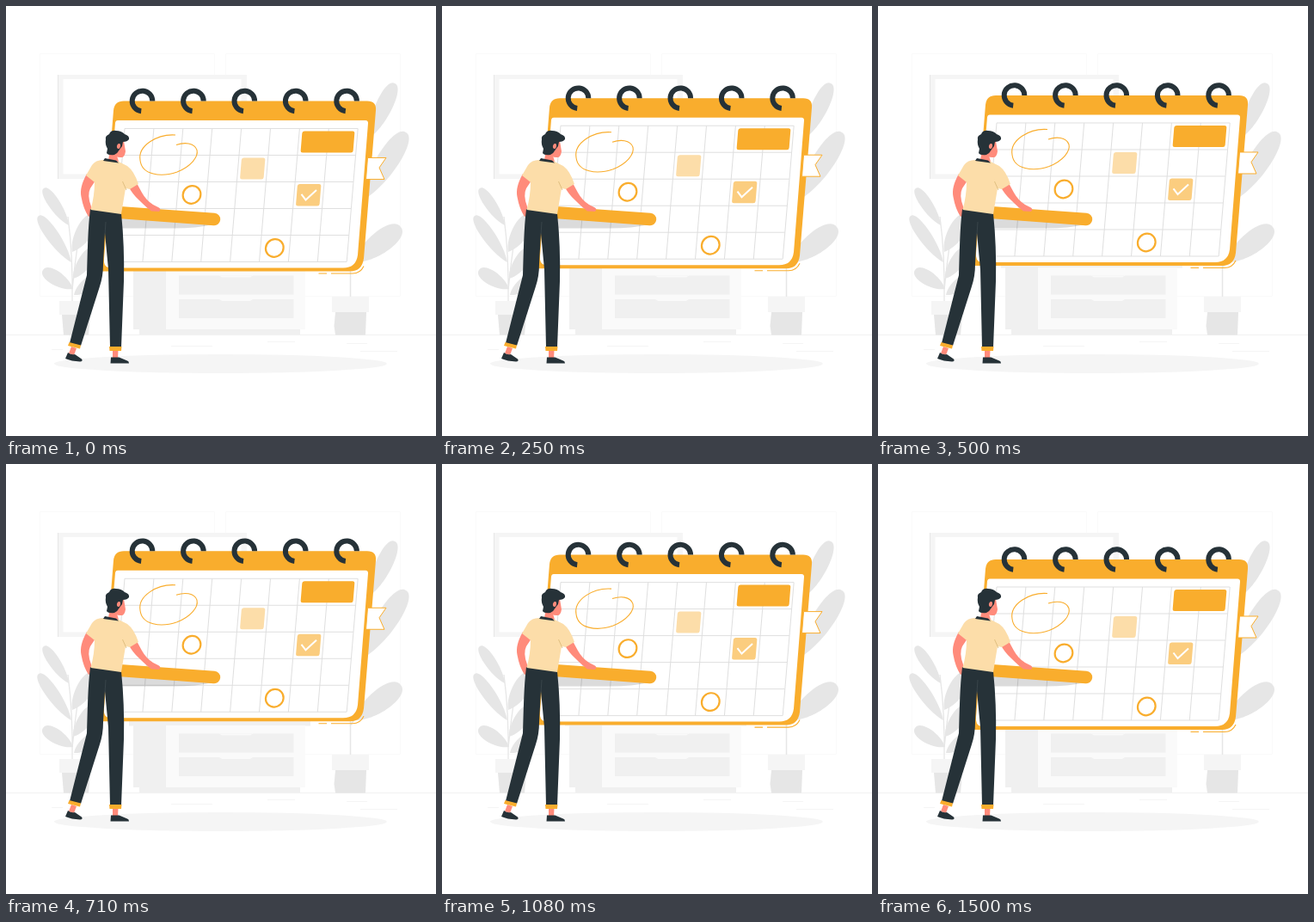
Animation of 500x500 px, one loop 1540 ms. Source, as an HTML page with a canvas:

```html
<!DOCTYPE html>
<html lang="en">
<head>
<meta charset="utf-8">
<title>Planning calendar</title>
<style>
html, body { margin: 0; width: 100%; height: 100%; overflow: hidden; background: #fff; }
canvas { display: block; width: 500px; height: 500px; }
</style>
</head>
<body>
<canvas id="stage" width="500" height="500"></canvas>
<script>
const ctx = document.getElementById('stage').getContext('2d');
const LOOP = 1540, STEPS = 37, RISE = 10;
const ORANGE = '#f9ad2d', CREAM = '#fcdda9', DARK = '#263238', SKIN = '#ff8b7b';
const LEAF = '#e6e6e6', PALE = '#f0f0f0', FAINT = '#f5f5f5', WHITE = '#fff';

function fill(color, path) {
  ctx.fillStyle = color;
  ctx.fill(new Path2D(path));
}

function line(color, width, path) {
  ctx.strokeStyle = color;
  ctx.lineWidth = width;
  ctx.stroke(new Path2D(path));
}

function box(color, x, y, w, h) {
  ctx.fillStyle = color;
  ctx.fillRect(x, y, w, h);
}

function ellipse(x, y, rx, ry, tilt = 0) {
  ctx.beginPath();
  ctx.ellipse(x, y, rx, ry, tilt, 0, Math.PI * 2);
}

// Rounded box that leans with the calendar page.
function tile(color, x, y, w, h) {
  ctx.save();
  ctx.transform(1, 0, -0.08, 1, x, y);
  ctx.fillStyle = color;
  ctx.beginPath();
  ctx.roundRect(0, 0, w, h, 2.5);
  ctx.fill();
  ctx.restore();
}

// Leaf from its base to its tip, bulging by w on both sides.
function leaf(x1, y1, x2, y2, w) {
  const dx = x2 - x1, dy = y2 - y1, len = Math.hypot(dx, dy);
  const nx = -dy / len * w, ny = dx / len * w;
  const side = s => [x1 + dx * .3 + nx * s, y1 + dy * .3 + ny * s,
                     x1 + dx * 1.02 + nx * s, y1 + dy * 1.02 + ny * s];
  const [a, b, c, d] = side(1), [e, f, g, h] = side(-1);
  fill(LEAF, `M${x1} ${y1}C${a} ${b} ${c} ${d} ${x2} ${y2}C${g} ${h} ${e} ${f} ${x1} ${y1}Z`);
}

function drawRoom() {
  line('#fafafa', 1, 'M39.5 55.5H242.5V337.5H39.5ZM255.5 55.5H458.5V337.5H255.5Z');
  box(FAINT, 60, 80, 220, 121);
  box(WHITE, 66.5, 85, 207, 110.5);
  box('#e6e6e6', 60, 80, 1, 121);
  line('#f2f2f2', 1, 'M0 382.5H500');
  line('#f5f5f5', 1, 'M192 395.5H240M304 390.5H336M396 392.5H420M412 401.5H455M53 399.5H66');

  box(PALE, 143, 299, 211, 5.5);
  box('#fafafa', 186, 304, 162, 72);
  box(PALE, 148, 304, 38, 72);
  box(PALE, 155, 376, 187, 6);
  for (const y of [313.5, 341]) {
    box(PALE, 201, y, 133.5, 22);
    fill('#fafafa', `M248 ${y}H287L284 ${y + 2}H251Z`);
  }
  fill(FAINT, 'M56 416A193.5 11 0 0 1 443 416A193.5 11 0 0 1 56 416Z');
}

function drawPlants() {
  line(LEAF, 1.5, 'M400.5 340V285Q402 230 422 170M400 305Q404 296 414 292');
  leaf(422, 154, 452, 90, 13);
  leaf(414, 226, 465, 147, 17);
  leaf(405, 298, 459, 257, 17);
  box(FAINT, 379, 338, 43, 18);
  fill(LEAF, 'M383 356H419L418 382.5H383L381.5 372Z');

  line(LEAF, 1.3, 'M77 345Q78 290 72 245M77 330Q80 300 84 272');
  leaf(73, 255, 44, 212, 9);
  leaf(76, 298, 38, 244, 10);
  leaf(78, 329, 43, 307, 11);
  leaf(77, 286, 103, 243, 13);
  leaf(78, 317, 104, 281, 11);
  leaf(79, 336, 108, 314, 10);
  box(FAINT, 62, 343, 38, 16);
  fill(LEAF, 'M65 359H98L96 382.5H67Z');
}

function drawGrid() {
  let path = '';
  for (let row = 0; row < 6; row++) {
    const y = 143 + row * 31, x = 138 - row * 2.6;
    path += `M${x} ${y}H${x + 271}`;
  }
  for (let col = 0; col < 9; col++) {
    const x = 138 + col * 33.9;
    path += `M${x} 143L${x - 13} 298`;
  }
  line('#dfdfdf', 1, path);
}

function drawCalendar() {
  fill(ORANGE, 'M137 111H420Q431 111 430 122L416 294Q414 309 400 309H110L125 122Q126 111 137 111Z');
  fill(WHITE, 'M127 136.5Q127.3 133.5 130 133.5H418Q421.3 133.5 421 137L409 290Q407 305 392 305H120Q113 304 114 294Z');
  drawGrid();

  tile(ORANGE, 344.5, 146, 61, 25);
  tile(CREAM, 274, 177, 27.5, 25);
  tile('#fbcd7f', 339, 207.5, 27.5, 25.5);
  line(WHITE, 2, 'M343.5 219.5L348.5 226L361 214.5');
  ctx.strokeStyle = ORANGE;
  ctx.lineWidth = 2.2;
  for (const [x, y] of [[216, 220], [312.3, 282]]) {
    ellipse(x, y, 10.7, 10, -Math.PI / 4);
    ctx.stroke();
  }
  line(ORANGE, 1.1, 'M197 150.5C176 149 153 163 156 180C158 197 180 200 199 193.500C215 187 224 176 222 168C219 159 207 159 198 162');

  ctx.strokeStyle = DARK;
  ctx.lineWidth = 6;
  for (let i = 0; i < 5; i++) {
    ctx.beginPath();
    ctx.arc(158.5 + i * 59.4, 111, 11.8, 1.68, Math.PI * 2);
    ctx.stroke();
  }

  const flag = 'M420.500 177H442L434 188.500L440 202H418.500Z';
  fill(WHITE, flag);
  line(ORANGE, 1, flag);
  line(ORANGE, 1.1, 'M416 303Q412 311.500 403 311.500H378M373 311.500H363.500');
}

function drawMarker() {
  fill('rgba(0,0,0,.14)', 'M133 246L240 254Q222 258.500 195 258.500H133Z');
  fill(ORANGE, 'M133 233L242.500 240.800A7.200 7.200 0 0 1 241.500 255.200L133 247.200Z');
}

function drawMan() {
  // arms
  fill(SKIN, 'M94 195C88 206 86 214 87.500 222Q90 236 96 245L100 243L99 233Q94 220 98 212L104 203Z');
  fill(SKIN, 'M142 209Q147 219 155 226Q163 234 169 238.500L178 239Q181 236 177 234L171 231Q163 226 158 217L152 206Z');
  // feet
  fill(SKIN, 'M76 396L82 398L79 406L73 404ZM124 400H130.500L130 411H124Z');
  fill(DARK, 'M72 403Q76 406 80 405L88 410.500Q90 413 86 413.500Q76 413 69 410ZM122 408.500H131.500L141 412.500Q143 413 143 415.500H121.500Z');
  // trousers
  fill(DARK, 'M98 236C95 260 95 285 94 313L74 392L87 395L109 326Q113 314 113 300L115 264Q117 285 119 306L121 397H134L137 320Q138 280 134 241Z');
  fill(ORANGE, 'M73.500 391L87 394.500L86 398.500L72 395ZM120 396H134.500L134 401H120.500Z');
  line('#465157', .6, 'M115 266L116 251');
  // shirt
  fill(CREAM, 'M113 179Q104 179 100 185L93 197L103 205Q103 220 98.500 237L134 242L139 212L144 213L154 207Q149 192 141 186L131 181Z');
  line('#d9b877', .8, 'M135.500 204L140 214');
  // neck, face and hair
  fill(SKIN, 'M121 168L129 166L129 174L131 181L119 179Z');
  fill(SKIN, 'M127 156L137 157L139 169Q138 177 133 176Q127 176 124 170Z');
  fill(DARK, 'M115 177L128 179.500L131 182.500L113 180Z');
  fill(DARK, 'M116 155Q115 151 120 149Q122 144 128 145Q134 145 138 149Q144 151 143 155Q141 158 136 158L135 163L132 167Q130 171 126 173Q119 174 117 171L118 166Q115 161 116 155Z');
  ellipse(131, 163, 2, 3, .2);
  ctx.fillStyle = SKIN;
  ctx.fill();
}

// The calendar floats up and back down at constant speed, 24 poses a second.
function lift(time) {
  const step = Math.floor((time % LOOP + 5) / LOOP * STEPS);
  const phase = (step + 1) / STEPS % 1;
  return -RISE * (1 - Math.abs(2 * phase - 1));
}

function draw(time) {
  ctx.clearRect(0, 0, 500, 500);
  drawRoom();
  drawPlants();
  ctx.save();
  ctx.translate(0, lift(time));
  drawCalendar();
  ctx.restore();
  drawMarker();
  drawMan();
}

const start = performance.now();
function tick() {
  draw(performance.now() - start);
  requestAnimationFrame(tick);
}
tick();
</script>
</body>
</html>
```
